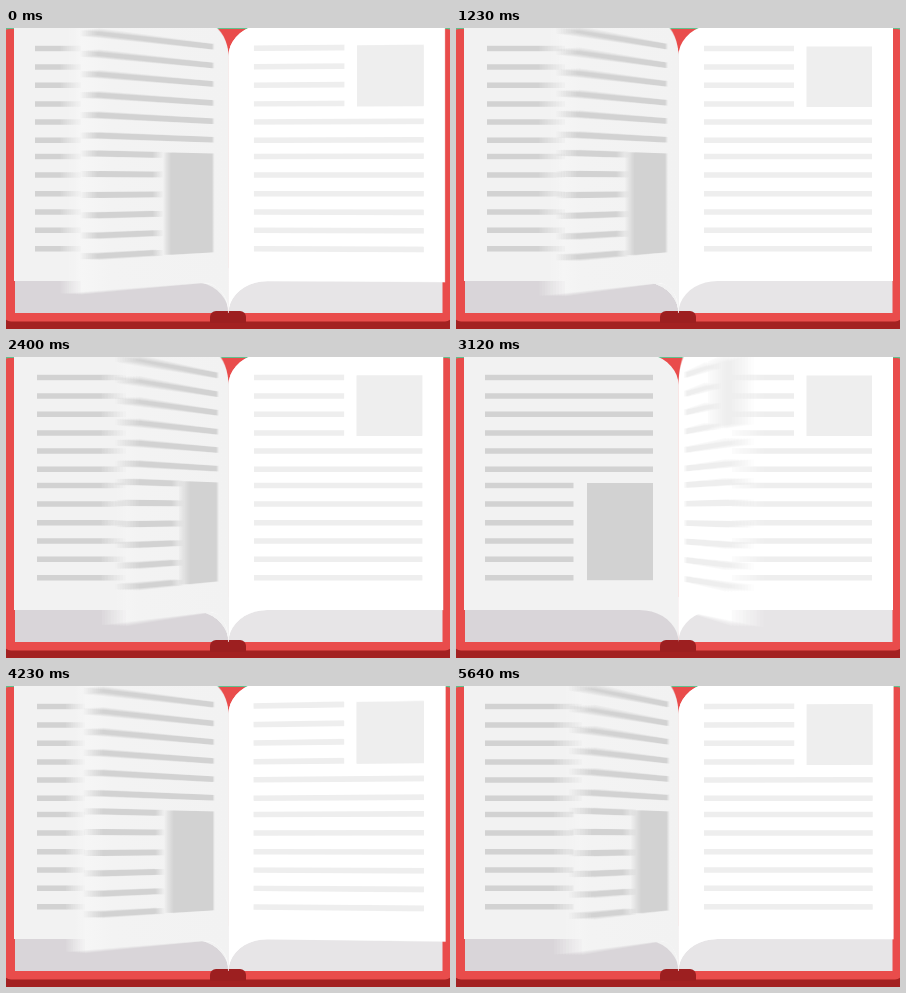
These frames come from a looping animation (444x301 px, 5670 ms). An HTML page with a canvas:

```html
<!DOCTYPE html>
<html lang="en">
<head>
<meta charset="utf-8">
<title>Turning pages</title>
<style>
  html, body { margin: 0; width: 100%; height: 100%; overflow: hidden; background: #62c08c; }
  canvas { display: block; width: 444px; height: 301px; }
</style>
</head>
<body>
<canvas id="stage" width="444" height="301"></canvas>
<script>
const W = 444, H = 301;
const STEP = 30, STEPS = 189;
const TURN = 18.5;              // length of one page turn, in steps
const SHUTTER = 0.56, SAMPLES = 10;
const SPINE = 222.5, EYE_Y = 155, DEPTH = 1355;
const PAGE = 214.5, FOLD = 39, DROP = 32, TOP = -4, BOTTOM = 253;

// Each leaf: [step it turns to the left, step it turns back].
const longRun = [[-12, 93.7], [-1.9, 83.1], [8.7, 72.6], [19.2, 62.1], [29.7, 51.6]];
const shortRun = [[-99, 143.5], [-99, 134.4], [-99, 125.3]];

const ROWS = [20.5, 39, 57.3, 76, 94, 112.3, 128.5, 147, 165.7, 184, 202.2, 220.7];
const THICK = 5.4;

const out = document.getElementById('stage').getContext('2d');
const scene = document.createElement('canvas');
scene.width = W;
scene.height = H;
const g = scene.getContext('2d');

function ease(u) {
  const c = Math.min(1, Math.max(0, u));
  return (1 - Math.cos(Math.PI * c)) / 2;
}

function project(angle) {
  const cos = Math.cos(angle), sin = Math.sin(angle);
  return (d, y) => {
    const s = DEPTH / (DEPTH - d * sin);
    return [SPINE + d * cos * s, EYE_Y + (y - EYE_Y) * s];
  };
}

function polygon(points, fill) {
  g.beginPath();
  points.forEach(p => g.lineTo(p[0], p[1]));
  g.closePath();
  g.fillStyle = fill;
  g.fill();
}

// Curve from the flat part of a page down into the spine.
function foldCurve(at, y) {
  const points = [];
  for (let i = 0; i <= 10; i++) {
    const a = i / 10 * Math.PI / 2;
    points.push(at(FOLD * (1 - Math.sin(a)), y + DROP * (1 - Math.cos(a))));
  }
  return points;
}

function paper(at, left, moving) {
  const low = foldCurve(at, BOTTOM);
  const outer = at(PAGE, BOTTOM);
  let fill = left ? '#f2f2f2' : '#ffffff';
  if (left && moving) {
    fill = g.createLinearGradient(outer[0], 0, SPINE, 0);
    fill.addColorStop(0, '#f8f8f8');
    fill.addColorStop(0.3, '#f3f3f3');
    fill.addColorStop(1, '#f2f2f2');
  }
  polygon([at(PAGE, TOP), outer, ...low, ...foldCurve(at, TOP).reverse()], fill);
  if (left && moving) {
    g.beginPath();
    low.forEach(p => g.lineTo(p[0], p[1]));
    g.strokeStyle = 'rgba(255,255,255,.6)';
    g.lineWidth = 1;
    g.stroke();
  }
}

function block(at, d0, d1, y0, y1, fill) {
  polygon([at(d0, y0), at(d1, y0), at(d1, y1), at(d0, y1)], fill);
}

function print(at, left, shift) {
  const ink = left ? '#d2d2d2' : '#eeeeee';
  const near = 25.5 - shift, far = 193.5 - shift;
  ROWS.forEach((y, i) => {
    let a = near, b = far;
    if (left && i > 5) a = 105 - shift;
    if (!left && i < 4) b = 115.5;
    block(at, a, b, y - THICK / 2, y + THICK / 2, ink);
  });
  if (left) block(at, near, 91.5 - shift, 126, 223.3, ink);
  else block(at, 128, far, 18.5, 79, ink);
}

function page(angle, shift, moving) {
  const left = angle > Math.PI / 2;
  const at = project(angle);
  paper(at, left, moving);
  print(at, left, shift);
}

function box(x, y, w, h, radii, fill) {
  g.beginPath();
  g.roundRect(x, y, w, h, radii);
  g.fillStyle = fill;
  g.fill();
}

function cover() {
  g.fillStyle = '#62c08c';
  g.fillRect(0, 0, W, H);
  box(-3, 6, W + 6, H, 0, '#a32121');
  box(-3, 1, W + 6, 292.5, [6, 6, 8, 8], '#e94c4b');
  box(9, 240, 213.5, 45, 0, '#d9d5d9');
  box(222.5, 240, 214, 45, 0, '#e7e5e7');
  box(204, 283, 36, 12, [6, 6, 0, 0], '#9d1f20');
}

function drawScene(t) {
  cover();
  page(0, 0, false);
  page(Math.PI, 0, false);
  const run = t < 125 ? longRun : shortRun;
  const leaves = run.map(([up, down]) =>
    Math.PI * (ease((t - up) / TURN) - ease((t - down) / TURN)));
  // Right pile: first leaf on top. Left pile: last leaf on top.
  leaves.slice().reverse().forEach(a => {
    if (a > 0.004 && a <= Math.PI / 2) page(a, 0, true);
  });
  leaves.forEach(a => {
    if (a > Math.PI / 2) page(a, 2, a < Math.PI - 0.004);
  });
}

function render(ms) {
  const step = Math.floor(ms / STEP) % STEPS;
  const t = step >= 170 ? step - STEPS : step;
  // Running average of several moments gives the motion blur.
  for (let i = 0; i < SAMPLES; i++) {
    drawScene(t + ((i + 0.5) / SAMPLES - 0.5) * SHUTTER);
    out.globalAlpha = 1 / (i + 1);
    out.drawImage(scene, 0, 0);
  }
}

const start = performance.now();
function tick() {
  render(performance.now() - start);
  requestAnimationFrame(tick);
}
tick();
</script>
</body>
</html>
```
